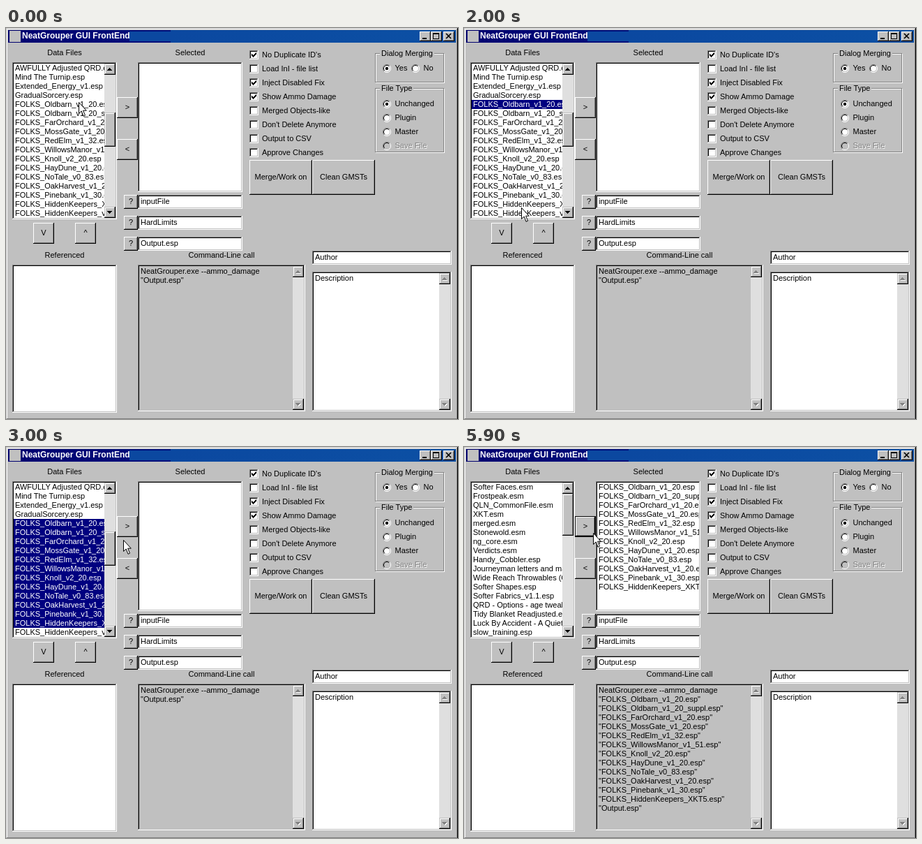
Recreate the animation shown at these times as an HTML page. Size 648x560 px, loop 6.5 s.

```html
<!DOCTYPE html>
<html lang="en">
<head>
<meta charset="utf-8">
<title>Plugin grouping demo</title>
<style>
html, body { margin: 0; width: 100%; height: 100%; overflow: hidden; }
#stage { position: relative; width: 648px; height: 560px; overflow: hidden; background: #c0c0c0;
  font: 11px/13px "Liberation Sans", Arial, sans-serif; color: #000; }
#stage div, #stage svg { position: absolute; white-space: pre; }
.raised { background: #c0c0c0; box-shadow: inset -1px -1px #000, inset 1px 1px #fff,
  inset -2px -2px #808080; }
.focused { box-shadow: inset 0 0 0 1px #000, inset -2px -2px #000, inset 2px 2px #fff,
  inset -3px -3px #808080; }
.frame { background: #c0c0c0; box-shadow: inset -1px -1px #000, inset 1px 1px #c0c0c0,
  inset -2px -2px #808080, inset 2px 2px #fff; }
.sunken { background: #fff; box-shadow: inset -1px -1px #fff, inset 1px 1px #808080,
  inset -2px -2px #c0c0c0, inset 2px 2px #000; }
.gray { background: #c0c0c0; }
.title { background: linear-gradient(90deg, #000070, #00107c 233px, #0b48a0 233px, #0c50a4); }
.patch { background: #0b48a0; }
.caption { color: #fff; font-weight: bold; font-size: 12px; }
.track { background: #dfdfdf; }
.group { border: 1px solid #808080; box-shadow: 1px 1px #fff, inset 1px 1px #fff; box-sizing: border-box; }
.legend { background: #c0c0c0; padding: 0 2px; }
.center { transform: translateX(-50%); }
.disabled { color: #808080; text-shadow: 1px 1px #fff; }
.clip { overflow: hidden; }
.selected { background: #000080; color: #fff; }
svg { overflow: visible; }
polygon { shape-rendering: crispEdges; }
</style>
</head>
<body>
<div id="stage"></div>
<script>
const stage = document.getElementById("stage");

function box(x, y, w, h, className = "", parent = stage) {
  const el = document.createElement("div");
  el.className = className;
  el.style.cssText = `left:${x}px;top:${y}px;width:${w}px;height:${h}px`;
  return parent.appendChild(el);
}

function label(x, middle, text, className = "") {
  const el = box(x, middle - 7, 0, 13, className);
  el.style.width = "auto";
  el.textContent = text;
  return el;
}

function drawing(x, y, w, h, content) {
  const holder = box(x, y, w, h);
  holder.innerHTML = `<svg width="${w}" height="${h}">${content}</svg>`;
  return holder;
}

function button(x, y, w, h, text) {
  const el = box(x, y, w, h, "raised");
  label(x + w / 2, y + h / 2, text, "center");
  return el;
}

function arrowButton(x, y, down, enabled) {
  box(x, y, 16, 16, "frame");
  const points = down ? "4,6 11,6 7.5,10" : "4,10 11,10 7.5,6";
  const shape = (color, shift) =>
    `<polygon points="${points}" fill="${color}" transform="translate(${shift},${shift})"/>`;
  drawing(x, y, 16, 16, enabled ? shape("#000", 0) : shape("#fff", 1) + shape("#808080", 0));
}

function scrollbar(x, y, h, enabled) {
  box(x, y, 16, h, "track");
  arrowButton(x, y, false, enabled);
  arrowButton(x, y + h - 16, true, enabled);
}

function field(y, text, x = 189, w = 150) {
  box(x, y, w, 20, "sunken");
  label(x + 4, y + 10, text);
}

function checkbox(y, text, checked) {
  box(349, y - 7, 13, 13, "sunken");
  if (checked) drawing(349, y - 7, 13, 13, `<path d="M3 5h1v1h1v1h1v-1h1v-1h1v-1h1v-1h1v3
    h-1v1h-1v1h-1v1h-1v1h-1v-1h-1v-1h-1z"/>`);
  label(367, y, text);
}

function radio(x, y, text, checked, disabled) {
  drawing(x - 6, y - 6, 12, 12, `
    <circle cx="6" cy="6" r="5" fill="${disabled ? "#c0c0c0" : "#fff"}"/>
    <g fill="none">
      <path d="M2 10A5.5 5.5 0 0 1 10 2" stroke="#808080"/>
      <path d="M10 2A5.5 5.5 0 0 1 2 10" stroke="#fff"/>
      <path d="M2.8 9.2A4.5 4.5 0 0 1 9.2 2.8" stroke="#000"/>
      <path d="M9.2 2.8A4.5 4.5 0 0 1 2.8 9.2" stroke="#c0c0c0"/>
    </g>
    ${checked ? '<circle cx="6" cy="6" r="2.2"/>' : ""}`);
  label(x + 11.5, y, text, disabled ? "disabled" : "");
}

function group(y, h, text) {
  box(529, y, 99, h, "group");
  label(536, y + 1, text, "legend");
}

function fillRows(list, rows, isSelected = () => false) {
  list.replaceChildren();
  rows.forEach((text, i) => {
    const row = box(0, i * 13, 400, 13, isSelected(i) ? "selected" : "", list);
    row.style.textIndent = "2px";
    row.textContent = text;
  });
}

const picked = ["Oldbarn_v1_20", "Oldbarn_v1_20_suppl", "FarOrchard_v1_20", "MossGate_v1_20",
  "RedElm_v1_32", "WillowsManor_v1_51", "Knoll_v2_20", "HayDune_v1_20", "NoTale_v0_83",
  "OakHarvest_v1_20", "Pinebank_v1_30", "HiddenKeepers_XKT5"].map(name => `FOLKS_${name}.esp`);
const filesBefore = ["AWFULLY Adjusted QRD.esp", "Mind The Turnip.esp", "Extended_Energy_v1.esp",
  "GradualSorcery.esp", ...picked, "FOLKS_HiddenKeepers_v1_20.esp"];
const filesAfter = ["Softer Faces.esm", "Frostpeak.esm", "QLN_CommonFile.esm", "XKT.esm", "merged.esm",
  "Stonewold.esm", "ng_core.esm", "Verdicts.esm", "Handy_Cobbler.esp", "Journeyman letters and maps.esp",
  "Wide Reach Throwables (QRS).esp", "Softer Shapes.esp", "Softer Fabrics_v1.1.esp",
  "QRD - Options - age tweak.esp", "Tidy Blanket Readjusted.esp", "Luck By Accident - A Quiet Day.esp",
  "slow_training.esp"];

// Window frame and title bar; the bottom edge runs just past the stage
box(0, 0, 648, 561, "frame");
box(3, 3, 642, 18, "title");
box(177, 5, 59, 14, "patch");
box(5, 4, 16, 16, "gray");
label(23, 12, "NeatGrouper GUI FrontEnd", "caption");
for (const x of [593, 609, 627]) box(x, 5, 16, 14, "raised");
drawing(593, 5, 16, 14, '<path d="M4 9h6v2h-6z"/>');
drawing(609, 5, 16, 14, '<path d="M3 2h9v9h-9zM4 4v6h7v-6z" fill-rule="evenodd"/>');
drawing(627, 5, 16, 14, '<path d="M4 3l7 7M11 3l-7 7" stroke="#000" stroke-width="1.6"/>');

// Buttons
const addButton = button(159, 99, 30, 30, ">");
button(159, 159, 30, 30, "<");
button(39, 279, 30, 30, "V");
button(99, 279, 30, 30, "^");
for (const y of [239, 269, 299]) button(169, y, 20, 20, "?");
button(349, 189, 90, 50, "Merge/Work on");
button(439, 189, 90, 50, "Clean GMSTs");

// Lists and text fields
label(84, 36, "Data Files", "center");
label(264, 36, "Selected", "center");
label(84, 326, "Referenced", "center");
label(309, 326, "Command-Line call", "center");
box(9, 49, 150, 225, "sunken");
box(189, 49, 150, 186, "sunken");
box(9, 339, 150, 212, "sunken");
box(189, 339, 240, 210, "sunken gray");
box(439, 349, 200, 200, "sunken");
field(239, "inputFile");
field(269, "HardLimits");
field(299, "Output.esp");
field(319, "Author", 439, 200);
label(443, 359, "Description");
scrollbar(141, 51, 221, true);
scrollbar(411, 341, 206, false);
scrollbar(621, 351, 196, false);
const thumb = box(141, 121, 16, 49, "frame");
const dataList = box(11, 51, 130, 221, "clip");
const selectedList = box(191, 51, 146, 182, "clip");
const commandText = box(191, 342, 220, 204, "clip");

// Options
["No Duplicate ID's", "Load InI - file list", "Inject Disabled Fix", "Show Ammo Damage",
  "Merged Objects-like", "Don't Delete Anymore", "Output to CSV", "Approve Changes"]
  .forEach((text, i) => checkbox(39 + 20 * i, text, [0, 2, 3].includes(i)));
group(36, 42, "Dialog Merging");
radio(546, 58, "Yes", true);
radio(587, 58, "No");
group(86, 92, "File Type");
["Unchanged", "Plugin", "Master", "Save File"]
  .forEach((text, i) => radio(546, 109 + 20 * i, text, i === 0, i === 3));

const cursor = drawing(0, 0, 12, 21, `<path fill="#fff" stroke="#000"
  d="M.5 .5V16.5L4.2 13 7 20.3 9.5 19.2 6.6 12.2H11.3z"/>`);
const cursorStops = [[104, 106], [104, 106], [82, 257], [168, 133], [174, 116], [185, 123]];

function show(step) {
  const moved = step === 5;
  const lastSelected = [3, 4, 4, 15, 15, -1][step];
  fillRows(dataList, moved ? filesAfter : filesBefore, i => i >= 4 && i <= lastSelected);
  fillRows(selectedList, moved ? picked : []);
  fillRows(commandText, ["NeatGrouper.exe --ammo_damage",
    ...(moved ? picked : []).map(name => `"${name}"`), '"Output.esp"']);
  thumb.style.top = moved ? "67px" : "121px";
  thumb.style.height = moved ? "60px" : "49px";
  addButton.classList.toggle("focused", step >= 4);
  const [x, y] = cursorStops[step];
  cursor.style.left = x + "px";
  cursor.style.top = y + "px";
}

let shown = -1;
function tick() {
  const step = Math.min(5, Math.floor(performance.now() % 6500 / 1000));
  if (step !== shown) show(shown = step);
  requestAnimationFrame(tick);
}
tick();
</script>
</body>
</html>
```
